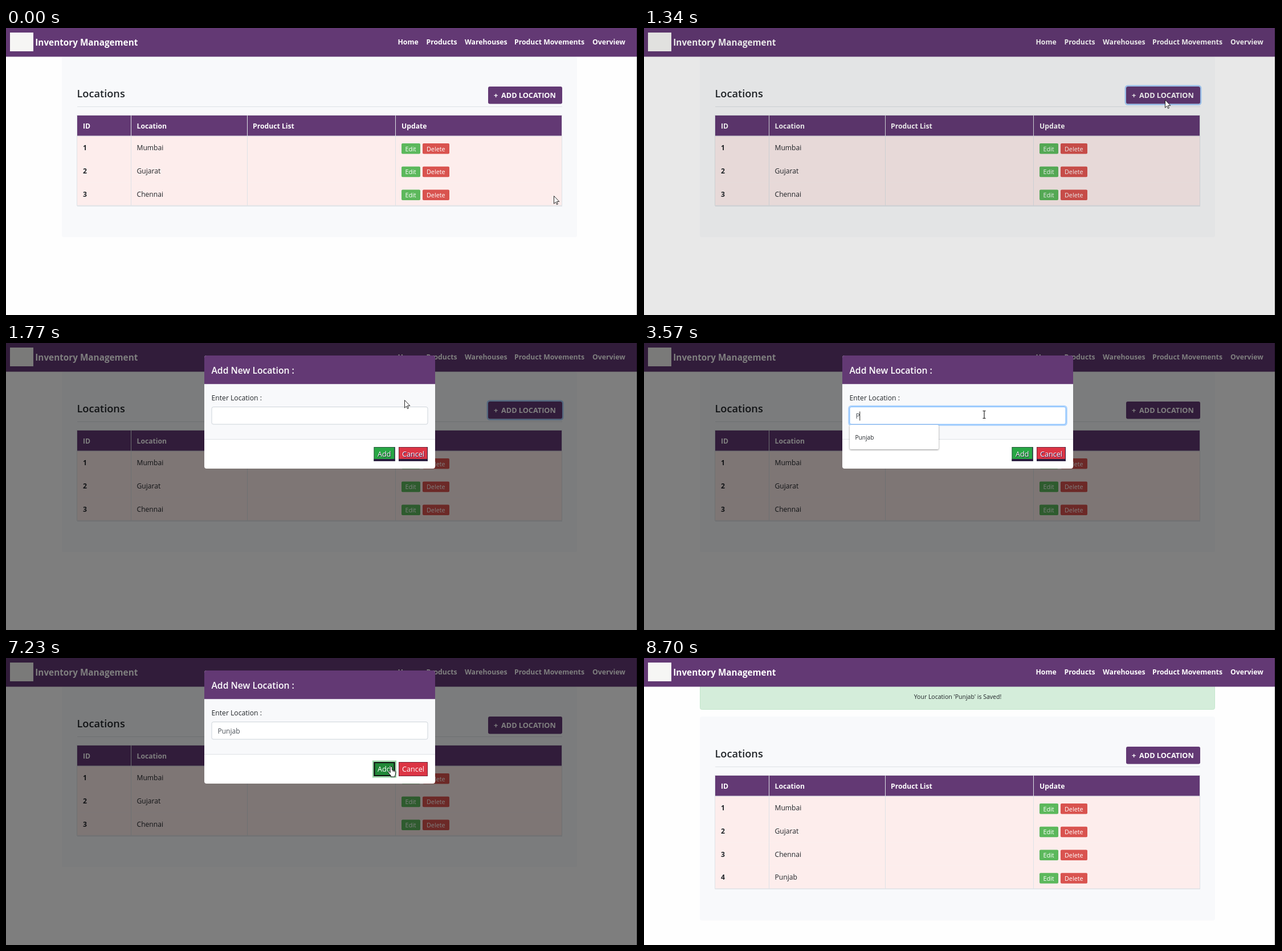
These frames come from a looping animation (1109 by 505 pixels, 9630 ms). An HTML page:

```html
<!DOCTYPE html>
<html lang="en">
<head>
<meta charset="utf-8">
<title>Inventory Management</title>
<style>
  html, body { margin: 0; width: 100%; height: 100%; overflow: hidden; background: #fefefe; }
  svg { display: block; width: 100vw; height: 100vh; }
  text { font-family: "Open Sans", "Noto Sans", sans-serif; white-space: pre; }
  .list { filter: drop-shadow(0 1px 1.5px rgba(0, 0, 0, .45)); }
</style>
</head>
<body>
<svg id="stage" viewBox="0 0 1109 505"></svg>
<script>
const LOOP = 9630, PURPLE = '#633974', LINE = '#dee2e6', INK = '#212529';

const rect = (x, y, w, h, fill, more = '') =>
  `<rect x="${x}" y="${y}" width="${w}" height="${h}" fill="${fill}" ${more}/>`;
const text = (x, y, size, str, fill = INK, weight = 400, more = '') =>
  `<text x="${x}" y="${y}" font-size="${size}" font-weight="${weight}" fill="${fill}" ${more}>${str}</text>`;
const group = (id, body, more = '') => `<g id="${id}" ${more}>${body}</g>`;

function row(name, i) {
  const y = i * 40.75;
  return rect(125, 190 + y, 851, 41, '#fdedec') +
    rect(125, Math.round(231 + y), 851, 1, LINE) +
    text(135, 215 + y, 12.2, i + 1, INK, 700) +
    text(229.5, 215 + y, 12.1, name) +
    rect(694, 203 + y, 33, 18.5, '#5cb85c', 'rx="2"') +
    text(700.5, 216.7 + y, 10.8, 'Edit', '#fff') +
    rect(731, 203 + y, 47, 18.5, '#d9534f', 'rx="2"') +
    text(738, 216.7 + y, 10.8, 'Delete', '#fff');
}

function panel(names) {
  const h = names.length * 40.75;
  return rect(98, 50, 904, 196 + h, '#f8f9fb', 'rx="4"') +
    text(124.5, 122, 18.2, 'Locations', INK, 600) +
    rect(125, 138, 851, 1, LINE) +
    rect(846, 103, 130, 30.5, PURPLE, 'rx="3"') +
    text(856, 123, 12.7, '+', '#fff', 700) +
    text(869, 123, 12.7, 'ADD LOCATION', '#fff', 700) +
    rect(125, 153, 851, 37, PURPLE) +
    [['ID', 135], ['Location', 229.5], ['Product List', 433], ['Update', 694]]
      .map(([s, x]) => text(x, 176.7, 12.2, s, '#fff', 700)).join('') +
    names.map(row).join('') +
    [219, 423, 683].map(x => rect(x, 153, 1, 37 + h, LINE)).join('') +
    rect(125, 189.5, 851, 1.2, LINE) +
    rect(124.5, 153.5, 851, 36.5 + h, 'none', `stroke="${LINE}"`);
}

const nav = rect(0, 0, 1109, 50.5, PURPLE) +
  rect(7, 8, 41, 33, '#f6f6f4') +
  text(51.3, 31, 15.3, 'Inventory Management', '#fff', 700) +
  [['Home', 687.5], ['Products', 737.5], ['Warehouses', 805], ['Product Movements', 892], ['Overview', 1029]]
    .map(([s, x]) => text(x, 29.4, 12.25, s, '#fff', 700)).join('');

const button = (x, w, label, fill, id) =>
  rect(x, 183, w, 25, fill, `id="${id}"`) +
  rect(x + .5, 183.5, w - 1, 24, 'none', 'stroke="#22152f" stroke-opacity=".55"');
const bevel = (x, w) => rect(x, 204, w, 4, '#2c1e40') + rect(x + w - 1, 183, 1, 25, '#2c1e40');
const caption = (x, s, more) => text(x, 200.3, 12.6, s, '#fff', 400, more);

const modal =
  rect(348, 22, 405, 199, '#fff', 'rx="4"') +
  `<path d="M348 72.5V26q0-4 4-4h397q4 0 4 4v46.5z" fill="${PURPLE}"/>` +
  text(360.5, 53.6, 15.7, 'Add New Location :', '#fff', 600) +
  rect(348, 72.5, 405, 97, '#f8f9fb') +
  rect(348, 169, 405, 1, LINE) +
  text(360.5, 101, 12.2, 'Enter Location :') +
  rect(361, 112.5, 379, 30.5, '#fff', 'id="input" rx="3" stroke="#ced4da"') +
  rect(359.5, 111, 382, 33.5, 'none', 'id="inputRing" rx="4" stroke="#007bff" stroke-opacity=".3" stroke-width="2.6"') +
  text(371.5, 133.2, 12, '', '#495057', 400, 'id="typed"') +
  rect(371, 120.5, 1, 16, '#222', 'id="caret"') +
  button(645.5, 37, 'Add', '#28a745', 'add') +
  button(689, 51, 'Cancel', '#dc3545', 'cancel') +
  group('bevels', bevel(645.5, 37) + bevel(689, 51) +
    text(652.8, 201.3, 12.6, 'Add', '#1c1430') + text(695.8, 201.3, 12.6, 'Cancel', '#2c1e60')) +
  group('addRing',
    rect(644.2, 181.7, 39.6, 27.6, 'none', 'stroke="#28a745" stroke-opacity=".45" stroke-width="2.6"') +
    rect(646.5, 184, 35, 23, 'none', 'stroke="#101010" stroke-width="2"')) +
  caption(652, 'Add') + caption(695, 'Cancel');

const suggestions = ['Punjab', 'Chennai', 'Gujarat', 'Mumbai', 'Kerala', 'Delhi'];
const list = rect(361, 144, 156, 43, '#fff', 'id="listBox" class="list" rx="2"') +
  suggestions.map((s, i) => text(370.5, 169.5 + i * 29.2, 10.1, s, INK, 400, i ? 'class="extra"' : '')).join('');

const cursors =
  group('arrow', '<path d="M.5.6V14.2L3.6 11.2 5.5 15.6 7.4 14.8 5.5 10.4H9.8z" fill="#fff" stroke="#111" stroke-width=".9"/>') +
  group('beam', '<path d="M-2.5-6.5h2l.5.5.5-.5h2M0-6V6M-2.5 6.5h2L0 6l.5.5h2" fill="none" stroke="#111" stroke-width="1.1"/>') +
  group('hand', '<path d="M-1.8 1.6a1.6 1.6 0 0 1 3.2 0V6l4.8 1.3q1.9.6 1.7 2.8L7.4 14q-.3 1-.8 1.7V18H-.8v-2L-5.2 10.7q-.6-1.6.9-1.9 1 0 2.5 1.8zM3.2 6.6v2.6M5.6 7.3v2.3" fill="#fff" stroke="#111" stroke-width="1"/>');

document.getElementById('stage').innerHTML =
  rect(0, 0, 1109, 505, '#fefefe') +
  group('before', panel(['Mumbai', 'Gujarat', 'Chennai']) +
    rect(844.8, 101.8, 132.4, 33, 'none', 'id="openRing" rx="4" stroke="#8cc3ff" stroke-opacity=".75" stroke-width="2.4"')) +
  group('after', rect(98.5, 46, 903, 44.5, '#d4edda', 'rx="3" stroke="#c3e6cb"') +
    text(550.5, 72, 10.5, "Your Location 'Punjab' is Saved!", INK, 400, 'text-anchor="middle"') +
    group('shifted', panel(['Mumbai', 'Gujarat', 'Chennai', 'Punjab']), 'transform="translate(0 53)"')) +
  nav +
  rect(0, 0, 1109, 505, '#000', 'id="shade"') +
  group('modal', modal) +
  group('list', list) +
  rect(1107, 0, 2, 505, '#000') +
  cursors;

const $ = id => document.getElementById(id);
const show = (id, on) => $(id).setAttribute('visibility', on ? 'inherit' : 'hidden');
const within = (t, a, b) => t >= a && t < b;
const ramp = (t, start, length) => Math.min(1, Math.max(0, (t - start) / length));
const easeOut = k => 1 - (1 - k) ** 3;

// Pointer path: time, x, y
const path = [
  [180, 961, 295], [840, 911, 126], [1070, 911, 126], [1240, 914, 126], [1450, 914, 126],
  [1770, 699, 100], [1900, 699, 100], [2080, 597, 119.5], [2200, 597, 119.5], [2320, 597, 126],
  [5720, 597, 126], [5910, 675, 178], [6050, 675, 178], [6250, 702, 192], [6460, 676, 191],
  [7850, 676, 191], [8070, 811, 237], [8180, 811, 237], [8390, 904, 389], [8540, 904, 389], [8620, 975, 471]
];
function pointer(t) {
  const i = path.findIndex(p => p[0] > t);
  if (i < 0) return path[path.length - 1].slice(1);
  if (!i) return path[0].slice(1);
  const [t0, x0, y0] = path[i - 1], [t1, x1, y1] = path[i], k = (t - t0) / (t1 - t0);
  return [x0 + (x1 - x0) * k, y0 + (y1 - y0) * k];
}
function pointerKind(t, x, y) {
  if (t >= 8700) return '';
  if (within(t, 790, 1200) || within(t, 7470, 7890)) return 'hand';
  if (!within(t, 1770, 7470)) return 'arrow';
  if (within(y, 112, 143)) return 'beam';
  return y > 183 && (within(x, 645, 683) || x > 689) ? 'hand' : 'arrow';
}

const keyTimes = [3500, 3970, 4200, 4980, 5130, 5360];
const caretOn = [[2600, 3100], [3500, 4750], [4980, 5860], [6360, 6690]];

function draw(t) {
  const saved = t >= 7470;
  show('before', !saved);
  show('after', saved);
  show('openRing', within(t, 1150, 2600));
  $('shade').setAttribute('opacity', saved ? 0 : .5 * easeOut(ramp(t, 1335, 100)));

  show('modal', within(t, 1470, 7470));
  $('modal').setAttribute('opacity', ramp(t, 1470, 150));
  $('modal').setAttribute('transform', `translate(0 ${-40 * (1 - easeOut(ramp(t, 1470, 300)))})`);

  const open = !saved, focus = within(t, 2600, 6690);
  $('input').setAttribute('stroke', focus ? '#80bdff' : '#ced4da');
  show('inputRing', focus);
  $('typed').textContent = 'Punjab'.slice(0, keyTimes.filter(k => k <= t).length);
  $('caret').setAttribute('x', 371 + $('typed').getComputedTextLength());
  $('caret').setAttribute('visibility', caretOn.some(([a, b]) => within(t, a, b)) ? 'inherit' : 'hidden');

  const full = t < 3500;
  show('list', within(t, 2640, 5360));
  $('listBox').setAttribute('height', full ? 189 : 43);
  document.querySelectorAll('.extra').forEach(e => e.setAttribute('visibility', full ? 'inherit' : 'hidden'));

  const [x, y] = pointer(t), kind = pointerKind(t, x, y);
  const over = open && kind === 'hand' && t > 5760;
  show('bevels', t < 5840);
  $('add').setAttribute('fill', over && x < 683 ? '#218838' : '#28a745');
  $('cancel').setAttribute('fill', over && x > 689 ? '#c82333' : '#dc3545');
  show('addRing', t >= 6690);
  for (const id of ['arrow', 'beam', 'hand']) {
    show(id, id === kind);
    $(id).setAttribute('transform', `translate(${x} ${y})`);
  }
}

function tick() {
  draw(performance.now() % LOOP);
  requestAnimationFrame(tick);
}
tick();
</script>
</body>
</html>
```
